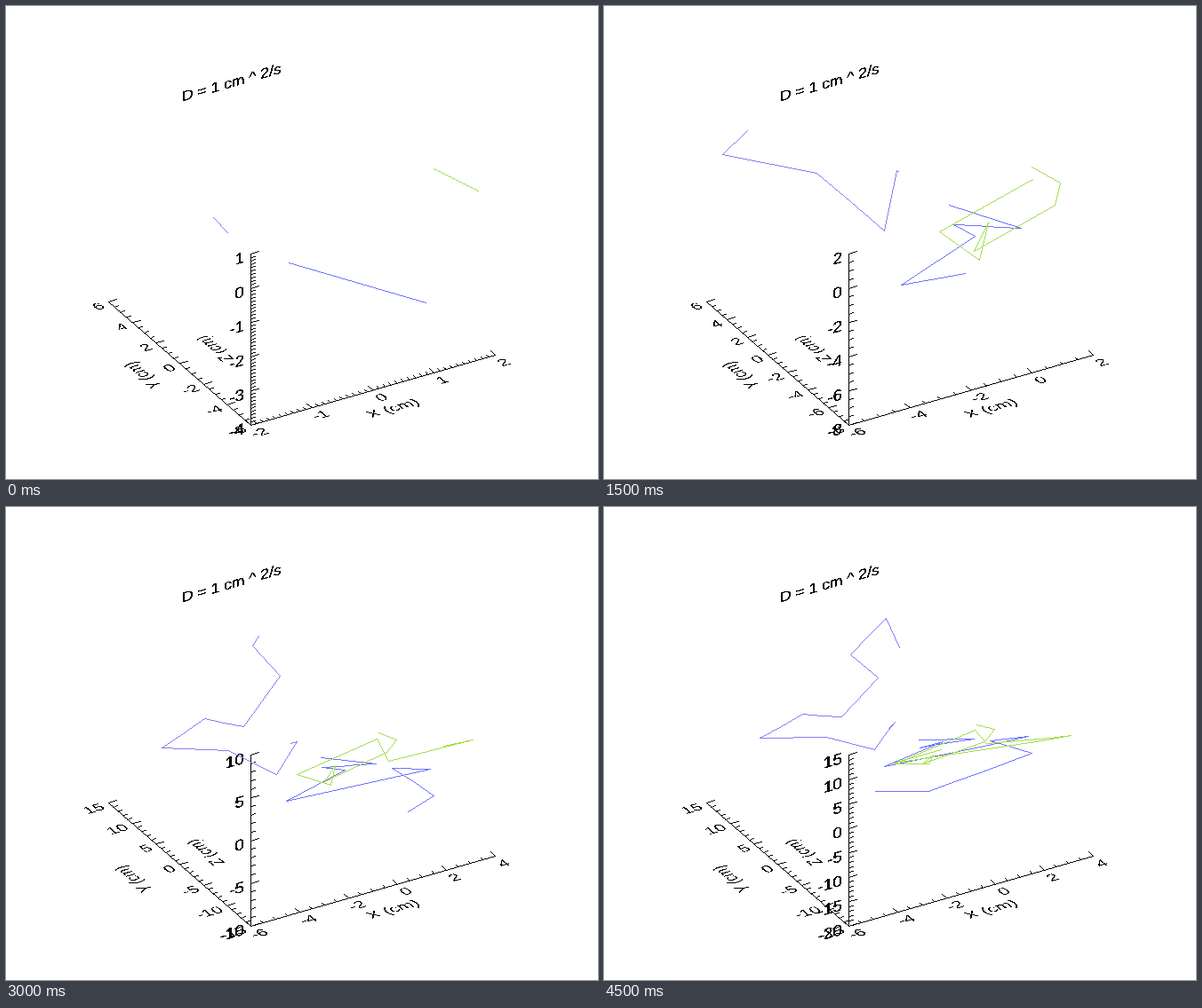
These frames come from a looping animation (666x533 px, 4750 ms). A matplotlib script:

```python
import numpy as np
import matplotlib.pyplot as plt
from matplotlib.animation import FuncAnimation
from matplotlib.path import Path
from matplotlib.textpath import TextPath

W, H, DPI = 666, 533, 100
STEPS = 19
BLACK = (0, 0, 0)

# Projected axis box, in pixels with y pointing down
ORIGIN = np.array([275.0, 472.0])
AXES = np.array([[275.0, -79.0], [-160.0, -139.0], [0.0, -193.0]])

# One em of text along each axis
EM_X = np.array([19.0, -5.46])
EM_Y = np.array([-11.0, -9.55])
EM_Z = np.array([0.0, -17.5])

TICK = 0.033
MAX_INTERVALS = 7
MINOR = {1: 10, 2: 4, 5: 5}

# Turning points of the walkers: step -> (x, y, z) in cm
VIOLET = {0: (-1.1, 1.8, -.73), 1: (-.43, 4.05, -2.19), 3: (-1.83, 1.07, -3.43),
          5: (-3.4, 3, -.28), 6: (-5.65, 5.5, .66), 8: (-3.73, 6.4, 2.08),
          10: (-2.35, 5.3, .54), 11: (-.42, 7.57, 3.84), 12: (-.76, 11.67, 5.65),
          18: (.6, 11.16, 11.5), 19: (1.1, 10.9, 5)}
BLUE = {0: (-.45, -1.21, -1.48), 1: (1.63, -2.05, -3.46), 4: (-.59, -2.03, -2.12),
        5: (.72, -.17, -4.43), 6: (-1.65, -.07, -6.1), 9: (3.71, -2.8, -5.42),
        10: (2.21, -2.45, -4.32), 12: (3.7, -3.7, -8.1), 16: (.48, 1.52, -15.6),
        19: (-1.27, 3.78, -15)}
GREEN = {0: (1.46, -3.62, .99), 1: (1.91, -5.04, .55), 2: (1.14, -6.8, .57),
         3: (-1.22, -5.95, -1.34), 4: (-.87, -6.3, .37), 5: (-.85, -5.35, -2.37),
         6: (-2.35, -5.92, .37), 7: (1.21, -4.45, .85), 8: (1.52, -5.31, -1.55),
         12: (3.73, -11.7, 2.21), 18: (-2.3, -5.5, 0), 19: (-.54, -6.35, 1)}


def walk(turns):
    """Fill in the steps between the turning points."""
    coords = np.array(list(turns.values())).T
    return np.column_stack([np.interp(range(STEPS + 1), list(turns), c) for c in coords])


WALKS = [(walk(VIOLET), (140, 122, 244)), (walk(BLUE), (110, 116, 252)),
         (walk(GREEN), (162, 222, 76))]

fig = plt.figure(figsize=(W / DPI, H / DPI), dpi=DPI, facecolor="white")
ax = fig.add_axes([0, 0, 1, 1])
ax.axis("off")
canvas = np.full((H, W, 3), 255, np.uint8)
image = ax.imshow(canvas, interpolation="nearest", aspect="auto")


def axis_range(values):
    """Round the data outwards to the finest tick step that gives few intervals."""
    for major in MINOR:
        low = int(np.floor(values.min() / major)) * major
        high = int(np.ceil(values.max() / major)) * major
        if (high - low) // major <= MAX_INTERVALS:
            break
    return low, high, major


def project(points, limits):
    low, high, _ = np.array(limits).T
    return ORIGIN + (points - low) / (high - low) @ AXES


def draw_line(start, end, color=BLACK):
    """Draw a hard-edged line one pixel wide."""
    start, end = np.rint(start), np.rint(end)
    count = int(abs(end - start).max()) + 1
    cols, rows = np.rint(np.linspace(start, end, count)).astype(int).T
    canvas[rows, cols] = color


def draw_text(text, pos, right, up, align="center", bold=False):
    """Fill hard-edged text in the plane spanned by right and up."""
    glyphs = TextPath((0, 0), text, size=1, prop={"family": "Liberation Sans"})
    box = glyphs.get_extents()
    anchor = box.x1 if align == "right" else (box.x0 + box.x1) / 2
    verts = (glyphs.vertices - [anchor, 0]) @ np.array([right, up]) + pos
    x0, y0 = np.floor(verts.min(axis=0)).astype(int)
    x1, y1 = np.ceil(verts.max(axis=0)).astype(int) + 2
    cols, rows = np.meshgrid(np.arange(x0, x1), np.arange(y0, y1))
    pixels = np.column_stack([cols.ravel(), rows.ravel()])
    for shift in (0, 0.5) if bold else (0,):
        inside = np.zeros(len(pixels), bool)
        for outline in Path(verts + [shift, 0], glyphs.codes).to_polygons():
            inside ^= Path(outline).contains_points(pixels)
        canvas[pixels[inside, 1], pixels[inside, 0]] = BLACK


def draw_axis(axis, limits, tick_axis, label):
    """Draw one axis with ticks and return the length of its longest label."""
    low, high, major = limits
    minor = MINOR[major]
    count = (high - low) // major * minor
    draw_line(ORIGIN, ORIGIN + AXES[axis])
    longest = 0
    for i in range(count + 1):
        base = ORIGIN + AXES[axis] * i / count
        is_major = i % minor == 0
        draw_line(base, base + AXES[tick_axis] * TICK * (1 if is_major else 0.5))
        if is_major:
            text = str(low + i // minor * major)
            longest = max(longest, len(text))
            label(text, base)
    return longest


def x_label(text, base):
    draw_text(text, base - 1.18 * EM_Y, EM_X, EM_Y)


def y_label(text, base):
    draw_text(text, base - 0.45 * EM_X - 0.46 * EM_Y, EM_X, EM_Y, "right")


def z_label(text, base):
    draw_text(text, base - 0.45 * EM_X - 0.4 * EM_Z, EM_X, EM_Z, "right", True)


def side_title(text, pos, longest):
    """Write a title along y, pushed outwards by long tick labels."""
    draw_text(text, pos - 0.556 * (longest - 2) * EM_X, EM_Y, -EM_X)


def draw(step):
    canvas[:] = 255
    shown = [(points[:step + 2], color) for points, color in WALKS]
    values = np.vstack([points for points, _ in shown])
    limits = [axis_range(column) for column in values.T]

    draw_axis(0, limits[0], 1, x_label)
    y_len = draw_axis(1, limits[1], 0, y_label)
    z_len = draw_axis(2, limits[2], 0, z_label)

    draw_text("D = 1 cm ^ 2/s", (253.5, 91), 0.92 * EM_X, 0.92 * EM_Z, bold=True)
    draw_text("X (cm)", (438, 456), EM_X, EM_Y)
    side_title("Y (cm)", np.array([160, 414]), y_len)
    side_title("Z (cm)", np.array([241, 384]), z_len)

    for points, color in shown:
        path = project(points, limits)
        for start, end in zip(path, path[1:]):
            draw_line(start, end, color)
    image.set_data(canvas)
    return [image]


anim = FuncAnimation(fig, draw, frames=STEPS, init_func=lambda: [image], interval=250,
                     repeat=True, repeat_delay=0)
plt.show()
```
